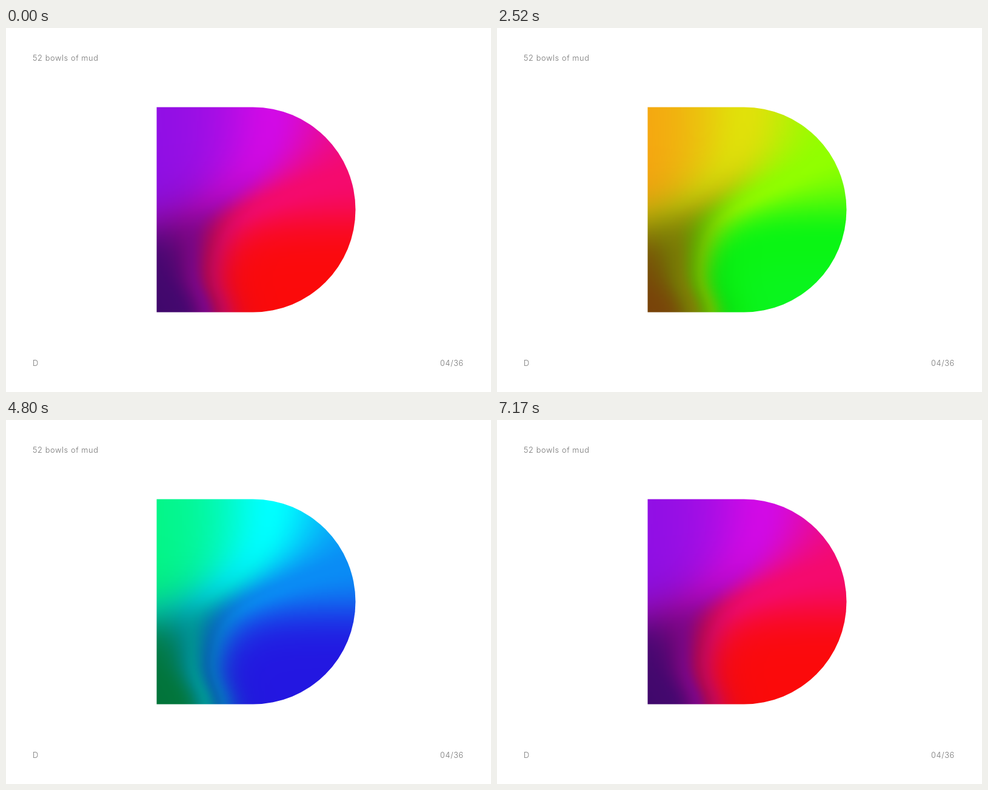
An HTML page with a canvas that plays this animation: 800x600 px, repeating every 7200 ms.

```html
<!DOCTYPE html>
<html lang="en">
<head>
<meta charset="utf-8">
<title>Letter D</title>
<style>
  html, body { margin: 0; width: 100%; height: 100%; overflow: hidden; background: #fff; }
  #stage { position: relative; width: 800px; height: 600px; }
  #letter {
    position: absolute; left: 248px; top: 130px; width: 330px; height: 340px;
    clip-path: path("M.5 .5H159.5A169 169 0 0 1 159.5 338.5H.5Z");
  }
  span {
    position: absolute; white-space: nowrap;
    font: 300 12.8px/16px Inter, "Open Sans", sans-serif;
    letter-spacing: .6px; color: #747474;
  }
</style>
</head>
<body>
<div id="stage">
  <span style="left:44px;top:42px">52 bowls of mud</span>
  <canvas id="letter" width="165" height="170"></canvas>
  <span style="left:44px;top:545px">D</span>
  <span style="left:716px;top:545px">04/36</span>
</div>
<script>
const LOOP = 7200, FRAMES = 200;

// Twelve colours, one every 30 degrees of the wheel.
const WHEEL = ['fb0a0a', 'ff8c14', 'e1e10a', '91ff00', '0af514', '05f57d',
  '00ffff', '0a8cf5', '2317e1', '8c10e5', 'd20ae6', 'f50a6e']
  .map(c => [0, 2, 4].map(i => parseInt(c.slice(i, i + 2), 16)));

const ease = t => t * t * (3 - 2 * t);

// Soft step: 0 well before the middle, 1 well after it.
const rise = (v, middle, width) => 1 / (1 + Math.exp((middle - v) / width));
const fall = (v, middle, width) => 1 - rise(v, middle, width);

// Hue lag and brightness, split by an S-shaped edge through the letter.
function shade(x, y) {
  const edge = 315 + 130 * fall(y, 265, 35) + 25 * rise(y, 440, 15);
  const spread = 22 + 48 * fall(y, 265, 45);
  const near = 32 * fall(y, 310, 35);
  const dip = 10 * Math.exp(-(((y - 325) / 40) ** 2));
  const far = 88 + 9 * rise(y, 420, 20) - dip;
  const lag = near + (far - near) * fall(x, edge, spread);
  const low = rise(y, 306 - .25 * (x - 290), 22);
  const light = 1 - .53 * low * fall(x, edge + 15, 18);
  return { lag, light };
}

const canvas = document.getElementById('letter');
const ctx = canvas.getContext('2d');
const W = canvas.width, H = canvas.height;
const image = ctx.createImageData(W, H);
const field = Array.from({ length: W * H }, (_, i) =>
  shade(249 + i % W * 2, 131 + Math.floor(i / W) * 2));

// Colour lookup in quarter degrees.
const ramp = Array.from({ length: 1440 }, (_, n) => {
  const i = Math.floor(n / 120), mix = ease(n / 120 - i);
  const next = WHEEL[(i + 1) % WHEEL.length];
  return WHEEL[i].map((c, k) => c + (next[k] - c) * mix);
});

function paint(angle) {
  const d = image.data;
  field.forEach(({ lag, light }, i) => {
    const c = ramp[Math.round((angle - lag + 360) * 4) % 1440];
    for (let k = 0; k < 3; k++) d[i * 4 + k] = c[k] * light;
    d[i * 4 + 3] = 255;
  });
  ctx.putImageData(image, 0, 0);
}

// Five steps every 180 ms: the first lasts 60 ms, the others 30 ms.
function stepAt(t) {
  const r = t % 180;
  return Math.floor(t / 180) * 5 + Math.max(0, Math.floor(r / 30) - 1);
}

const start = performance.now();
let shown = -1;
function tick() {
  const step = stepAt((performance.now() - start) % LOOP);
  if (step !== shown) {
    shown = step;
    paint(360 * step / (FRAMES - 1));
  }
  requestAnimationFrame(tick);
}
tick();
</script>
</body>
</html>
```
